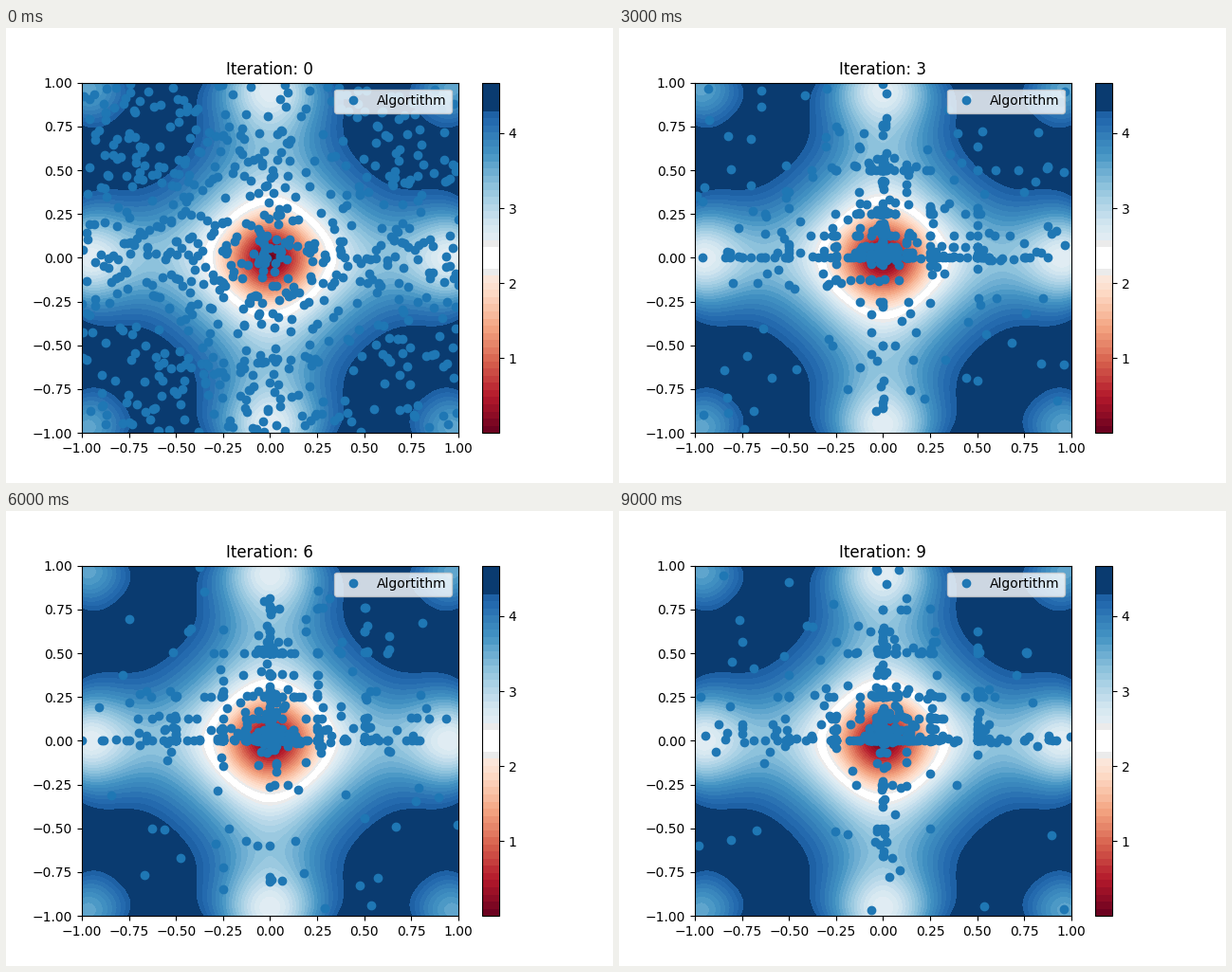
A matplotlib script that plays this animation: 640 px wide and 480 px high, repeating every 10000 ms.

```python
import numpy as np
import matplotlib.pyplot as plt
from matplotlib.animation import FuncAnimation
from matplotlib.colors import ListedColormap

STEPS = 10
POPULATION = 700
BITS = 9


def ackley(x, y):
    radius = np.sqrt(0.5 * (x**2 + y**2))
    waves = 0.5 * (np.cos(2 * np.pi * x) + np.cos(2 * np.pi * y))
    return 20 + np.e - 20 * np.exp(-0.2 * radius) - np.exp(waves)


def sparse_binary(rng, chance, negative):
    """Signed fractions with few binary digits set."""
    digits = rng.random((POPULATION, BITS)) < chance
    size = digits @ 0.5 ** np.arange(1, BITS + 1)
    return np.where(rng.random(POPULATION) < negative, -size, size)


def swarm(step):
    """Scattered at first, then gathered on simple binary fractions."""
    rng = np.random.default_rng(40 + step)
    both = 0.03 + 0.8 * np.exp(-0.75 * step)
    single = 0.12 * np.exp(-0.12 * step)
    chance = 0.15 - 0.05 * np.exp(-0.5 * step)
    jitter = 0.08 * np.exp(-4 * step)

    x = sparse_binary(rng, chance, 0.42) + rng.normal(0, jitter, POPULATION)
    y = sparse_binary(rng, chance, 0.12) + rng.normal(0, jitter, POPULATION)
    loose_x, loose_y = rng.uniform(-1, 1, (2, POPULATION))
    pick = rng.random(POPULATION)
    free_x = pick < both + single / 2
    free_y = (pick < both) | (np.abs(pick - both - 0.75 * single) < single / 4)
    return np.where(free_x, loose_x, x), np.where(free_y, loose_y, y)


def band_colors(count):
    """Red to blue with a plain white middle and a flat dark end."""
    cmap = plt.get_cmap("RdBu")
    colors = cmap((np.arange(count) + 0.5) / count)
    mid = count // 2
    colors[mid - 2:mid + 3, :3] = 0.92
    colors[mid - 1:mid + 2, :3] = 1.0
    colors[-4:] = cmap(0.98)
    return ListedColormap(colors)


fig, ax = plt.subplots(figsize=(6.4, 4.8), dpi=100)
grid = np.linspace(-1, 1, 201)
height = ackley(*np.meshgrid(grid, grid))
levels = np.linspace(0, height.max(), 50)
surface = ax.contourf(grid, grid, height, levels=levels,
                      cmap=band_colors(len(levels) - 1))
fig.colorbar(surface, ax=ax, ticks=range(1, 5))

dots, = ax.plot([], [], "o", label="Algortithm")
ax.set(xlim=(-1, 1), ylim=(-1, 1))
title = ax.set_title("Iteration: 0")
ax.legend(loc="upper right")


def update(step):
    dots.set_data(*swarm(step))
    title.set_text(f"Iteration: {step}")
    return dots, title


def init():
    return update(0)


anim = FuncAnimation(fig, update, frames=STEPS, init_func=init,
                     interval=1000, repeat=True, repeat_delay=0, blit=False)
plt.show()
```
